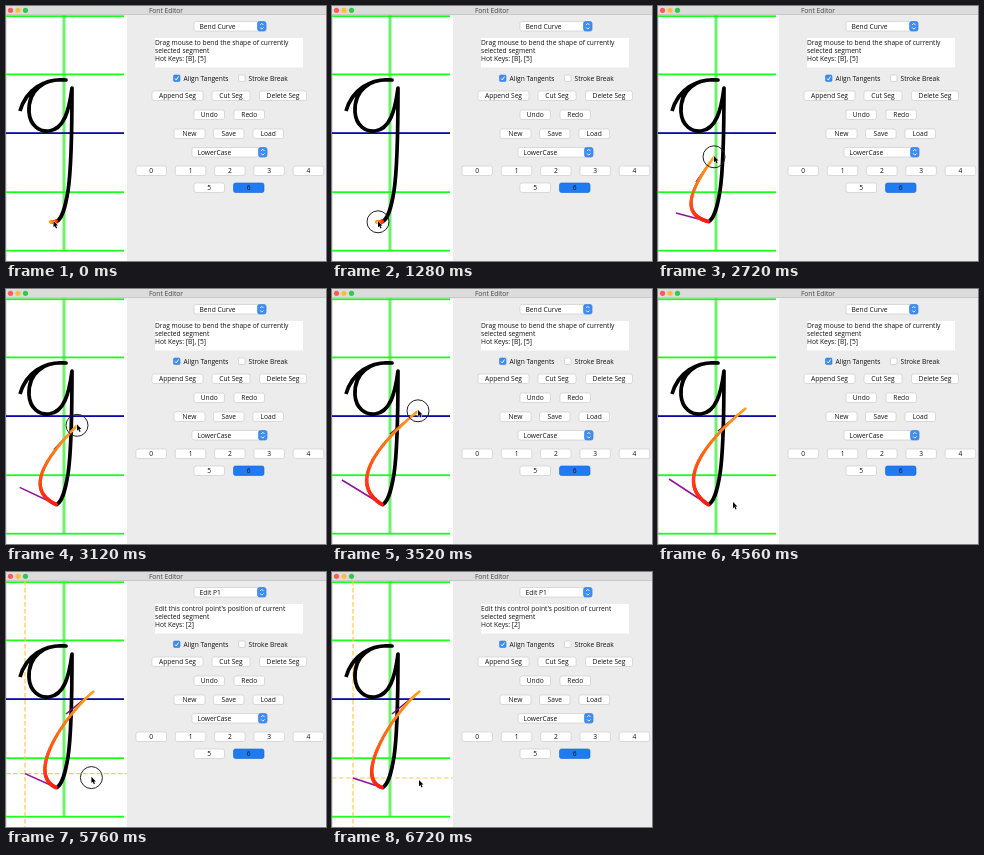
These frames come from a looping animation (320x255 px, 6880 ms). An HTML page with a canvas:

```html
<!DOCTYPE html>
<html lang="en">
<head>
<meta charset="utf-8">
<title>Font Editor</title>
<style>
html, body { margin: 0; width: 100%; height: 100%; overflow: hidden; background: #ececec; }
canvas { display: block; width: 320px; height: 255px; }
</style>
</head>
<body>
<canvas id="stage" width="320" height="255"></canvas>
<script>
const ctx = document.getElementById('stage').getContext('2d');
const LOOP = 6880, STEP = 80;
const MODE_AT = 4640;
const FONT = '6.67px "Open Sans", "Noto Sans", sans-serif';
const ANCHOR = [50, 215.5];

// Tracks: time, x, y
const cursorTrack = [
  [0, 47.5, 215], [400, 47.5, 215], [1040, 46, 215], [1360, 46, 215],
  [1840, 37, 204], [2240, 42, 178], [2720, 56, 150], [3520, 86, 121],
  [3760, 88, 119.5], [4080, 88, 119.5], [4560, 75, 213], [4800, 79, 196],
  [5280, 83, 200], [6080, 87, 208]
];
const p1Track = [
  [1360, 48, 216], [1840, 25, 210], [2720, 18, 207], [3280, 12, 195],
  [3520, 10, 191], [3760, 11, 190], [4880, 11, 190], [5280, 16, 195], [6080, 21, 206]
];
const p2Track = [
  [1360, 46, 216], [1840, 34, 209], [2240, 33, 193], [2720, 38, 176],
  [3520, 58, 145], [3760, 60, 142]
];
const p3Track = [
  [1360, 44, 216], [1840, 37, 204], [2240, 42, 178], [2720, 56, 151],
  [3520, 86, 122], [3760, 87.5, 119.5]
];

function sample(track, t) {
  if (t <= track[0][0]) return track[0].slice(1);
  for (let i = 1; i < track.length; i++) {
    const a = track[i - 1], b = track[i];
    if (t <= b[0]) {
      const k = (t - a[0]) / (b[0] - a[0]);
      return [a[1] + (b[1] - a[1]) * k, a[2] + (b[2] - a[2]) * k];
    }
  }
  return track[track.length - 1].slice(1);
}

function rect(x, y, w, h, color) {
  ctx.fillStyle = color;
  ctx.fillRect(x, y, w, h);
}

function line(a, b, color, width) {
  ctx.strokeStyle = color;
  ctx.lineWidth = width;
  ctx.beginPath();
  ctx.moveTo(...a);
  ctx.lineTo(...b);
  ctx.stroke();
}

function text(str, x, y, align = 'left', color = '#111') {
  ctx.fillStyle = color;
  ctx.textAlign = align;
  ctx.fillText(str, x, y);
}

function box(x, y, w, h, r, fill, border) {
  ctx.beginPath();
  ctx.roundRect(x, y, w, h, r);
  ctx.fillStyle = fill;
  ctx.fill();
  ctx.strokeStyle = border;
  ctx.lineWidth = 0.6;
  ctx.stroke();
}

function button(label, x, y, w, active) {
  box(x, y, w, 9.5, 2, active ? '#1f7bf2' : '#fff', active ? '#1464d2' : '#c6c6c6');
  text(label, x + w / 2, y + 7.2, 'center');
}

function row(y, items) {
  items.forEach(([label, x, w, active]) => button(label, x, y, w, active));
}

function combo(label, x, y, w) {
  box(x, y, w, 9.5, 2, '#fff', '#c6c6c6');
  box(x + w - 8.5, y, 8.5, 9.5, 2, '#3d8df5', '#2f7de6');
  text(label, x + 5.5, y + 7.2);
  const cx = x + w - 4.2, cy = y + 4.75;
  ctx.strokeStyle = '#fff';
  ctx.lineWidth = 0.9;
  for (const s of [-1, 1]) {
    ctx.beginPath();
    ctx.moveTo(cx - 1.7, cy + s * 1.2);
    ctx.lineTo(cx, cy + s * 2.9);
    ctx.lineTo(cx + 1.7, cy + s * 1.2);
    ctx.stroke();
  }
}

function checkbox(label, x, checked) {
  box(x, 69, 6.5, 6.5, 1.2, checked ? '#3b8cf5' : '#fff', checked ? '#2f7de6' : '#c0c0c0');
  if (checked) {
    ctx.strokeStyle = '#fff';
    ctx.lineWidth = 1;
    ctx.beginPath();
    ctx.moveTo(x + 1.6, 72.5);
    ctx.lineTo(x + 2.8, 74);
    ctx.lineTo(x + 5, 70.5);
    ctx.stroke();
  }
  text(label, x + 10, 74.6);
}

function drawTitleBar() {
  rect(0, 0, 320, 9, '#dcdcdc');
  rect(0, 8.5, 320, 0.7, '#b8b8b8');
  ['#fc5b57', '#fdbc40', '#34c84a'].forEach((color, i) => {
    ctx.fillStyle = color;
    ctx.beginPath();
    ctx.arc(4.5 + i * 7.5, 4.3, 2.6, 0, Math.PI * 2);
    ctx.fill();
  });
  text('Font Editor', 160, 6.7, 'center', '#444');
}

function drawControls(editing) {
  rect(121, 9, 199, 246, '#ececec');
  combo(editing ? 'Edit P1' : 'Bend Curve', 188, 15.5, 72);
  rect(149, 32, 148, 29.5, '#fff');
  const help = editing
    ? ["Edit this control point's position of current", 'selected segment', 'Hot Keys: [2]']
    : ['Drag mouse to bend the shape of currently', 'selected segment', 'Hot Keys: [B], [5]'];
  help.forEach((str, i) => text(str, 149, 39.3 + i * 7.6));
  checkbox('Align Tangents', 167.5, true);
  checkbox('Stroke Break', 232.5, false);
  row(85, [['Append Seg', 146, 51], ['Cut Seg', 206, 38], ['Delete Seg', 253.5, 47]]);
  row(104, [['Undo', 188, 30.5], ['Redo', 228, 30.5]]);
  row(123, [['New', 168, 31], ['Save', 207.5, 30.5], ['Load', 247, 30.5]]);
  combo('LowerCase', 186, 141.5, 75);
  row(160, [0, 1, 2, 3, 4].map(n => [String(n), 130 + n * 39.3, 30.5]));
  row(177, [['5', 188, 30.5], ['6', 227.5, 30.5, true]]);
}

function drawGuides() {
  rect(0, 9, 121, 246, '#fff');
  rect(0, 9, 0.6, 246, '#d0d0d0');
  rect(56.5, 9, 3, 236, '#6cf36c');
  for (const y of [9.3, 67.5, 185.3, 243.8]) rect(0, y, 118, 1.8, '#1cff1c');
  rect(0, 126.2, 118, 1.8, '#0a0aa8');
}

function drawGlyph() {
  ctx.strokeStyle = '#000';
  ctx.lineWidth = 3.7;
  ctx.lineJoin = 'round';
  ctx.stroke(new Path2D(
    'M14 105C20 84 38 72 60 74C38 72 22 84 23 106C24 120 34 126 43 125' +
    'C58 123 63 105 66 82C66 125 65 165 62 185C59 203 56 213 50 216'));
}

function drawSegment(p1, p2, p3) {
  line(ANCHOR, p1, '#93109b', 1.5);
  line(p3, p2, '#701060', 1.5);
  const at = t => [0, 1].map(i => {
    const s = 1 - t;
    return s * s * s * ANCHOR[i] + 3 * s * s * t * p1[i] + 3 * s * t * t * p2[i] + t * t * t * p3[i];
  });
  const n = 40;
  ctx.lineCap = 'round';
  for (let i = 0; i < n; i++) {
    const k = i / n;
    line(at(k), at((i + 1) / n), `rgb(255,${Math.round(25 + 140 * k)},${Math.round(15 + 10 * k)})`, 3.8 - 1.4 * k);
  }
  ctx.lineCap = 'butt';
}

function drawCrosshair([x, y]) {
  ctx.setLineDash([4.5, 2.5]);
  line([0, y], [121, y], '#ffc94d', 1.2);
  line([x, 9], [x, 255], '#ffc94d', 1.2);
  ctx.setLineDash([]);
}

function drawCursor([x, y], pressed) {
  if (pressed) {
    ctx.strokeStyle = '#222';
    ctx.lineWidth = 1;
    ctx.beginPath();
    ctx.arc(x, y + 0.8, 11, 0, Math.PI * 2);
    ctx.stroke();
  }
  ctx.save();
  ctx.translate(x, y);
  const arrow = new Path2D('M0 0V6.2L1.4 5L2.5 7.5L3.6 7L2.5 4.6H4.5Z');
  ctx.strokeStyle = '#fff';
  ctx.lineWidth = 1;
  ctx.stroke(arrow);
  ctx.fillStyle = '#000';
  ctx.fill(arrow);
  ctx.restore();
}

function draw(now) {
  const t = Math.floor((now % LOOP) / STEP) * STEP;
  const editing = t >= MODE_AT;
  const pressed = (t >= 1200 && t < 4160) || (t >= 4960 && t < 6640);
  const p1 = sample(p1Track, t);
  ctx.font = FONT;
  drawGuides();
  drawTitleBar();
  if (editing) drawCrosshair(p1);
  drawGlyph();
  drawSegment(p1, sample(p2Track, t), sample(p3Track, t));
  drawCursor(sample(cursorTrack, t), pressed);
  drawControls(editing);
}

let start;
function tick(now) {
  start ??= now;
  draw(now - start);
  requestAnimationFrame(tick);
}
draw(0);
requestAnimationFrame(tick);
</script>
</body>
</html>
```
